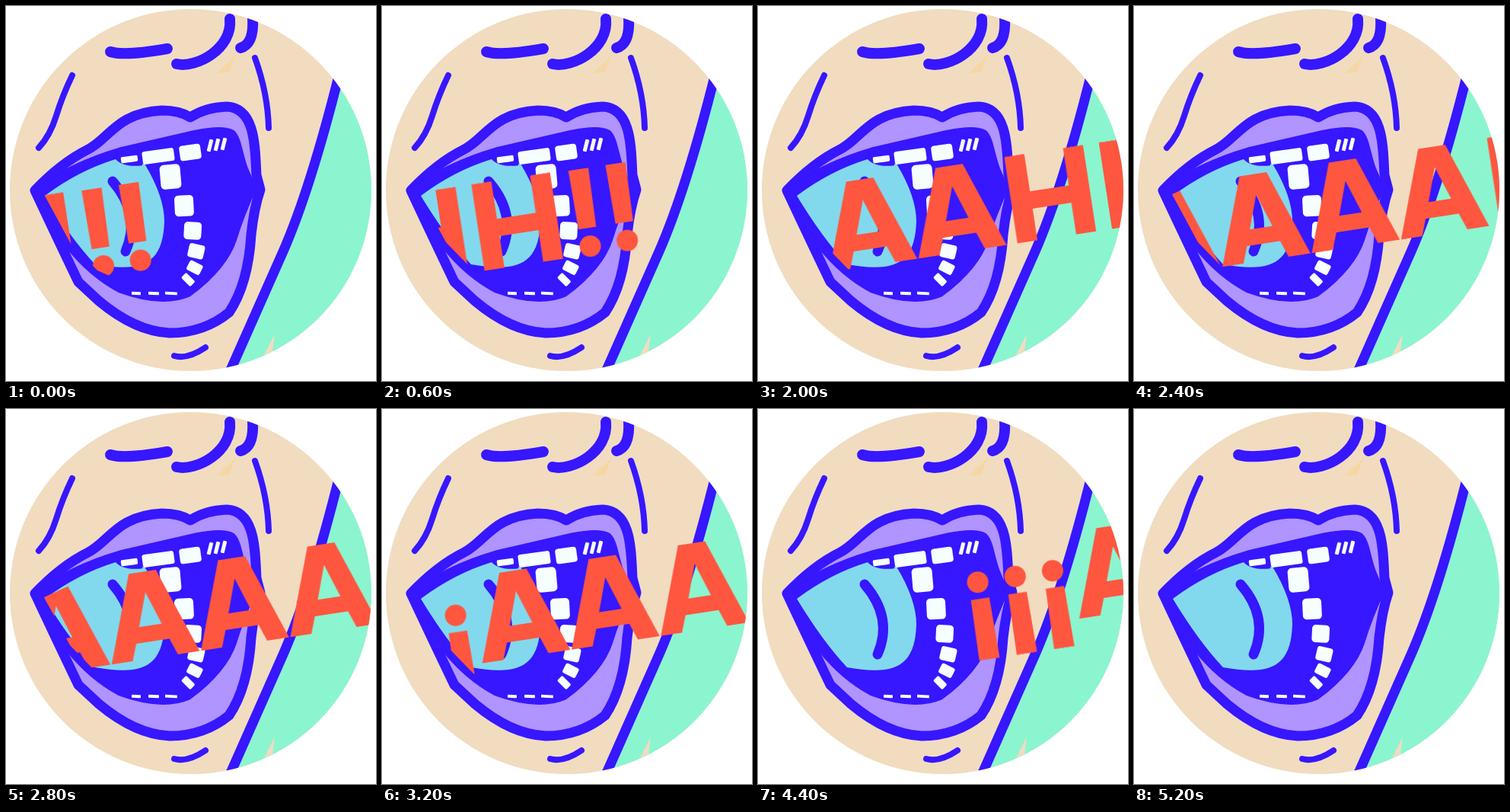
These frames come from a looping animation (486 px wide and 492 px high, 5.4 s). An HTML page:

```html
<!DOCTYPE html>
<html lang="en">
<head>
<meta charset="utf-8">
<title>Scream</title>
<style>
  html, body { margin: 0; width: 100%; height: 100%; overflow: hidden; background: #fff; }
  svg { display: block; width: 486px; height: 492px; }
  .ink { fill: none; stroke: #3617ff; stroke-linecap: round; }
  .tooth { fill: #f5ffff; }
  #shout { fill: #ff563f; animation: shout 5400ms steps(4) infinite; }

  /* The word climbs out of the mouth in 200 ms hops. */
  @keyframes shout {
    0% { transform: translate(-995px, 524px); animation-timing-function: steps(6); }
    22.2222% { transform: translate(-704px, 472px); }
    37.037% { transform: translate(-395px, 424px); }
    51.8518% { transform: translate(-115px, 374px); }
    66.6666% { transform: translate(105.5px, 335px); }
    81.4814% { transform: translate(285.5px, 296px); }
    96.2962%, 100% { transform: translate(490px, 258px); }
  }
</style>
</head>
<body>
<svg viewBox="0 0 486 492" role="img" aria-label="iiiAAAAAHHH!!">
  <defs>
    <clipPath id="disc"><circle cx="242.5" cy="241.5" r="237.5"/></clipPath>
    <clipPath id="throat"><path d="M130 100L85 231L50 247L84 310L120 347L136 354L150 420H486V100Z"/></clipPath>
    <g id="i"><path d="M1-80H25.500L27 0H0Z"/><circle cx="13.500" cy="-102" r="14"/></g>
    <path id="A" fill-rule="evenodd" d="M0 0L40-114H76L117 0H88L80-22H36L28 0ZM43-43H73L58-87Z"/>
    <path id="H" d="M0 0V-114.500H26.500V-65H78V-114.500H104.500V0H78V-42H26.500V0Z"/>
    <g id="bang"><path d="M0-113H26.500L25-35H1.500Z"/><circle cx="13.500" cy="-11" r="14"/></g>
  </defs>
  <g clip-path="url(#disc)">
    <rect width="486" height="492" fill="#f1dcc0"/>

    <!-- Collar -->
    <path fill="#8bf5cf" d="M438 90H486V492H290L355 342Q385 280 410 185Z"/>
    <path fill="#f1dcc0" d="M353 430L339 458L350 453Z"/>
    <path class="ink" stroke-width="13" d="M438 88Q400 240 364 322T293 482"/>

    <!-- Nose, cheeks and chin -->
    <path fill="#f6d7a4" d="M302 64L277 88L293 87Z"/>
    <g class="ink" stroke-width="14">
      <path d="M137 60Q155 66 212 56"/>
      <path d="M224 76C250 82 298 56 294 17"/>
      <path d="M308 55Q326 50 324 16"/>
    </g>
    <g class="ink" stroke-width="8">
      <path d="M87 91Q74 118 66 144T43 186"/>
      <path d="M327 68Q344 115 345 160"/>
      <path d="M221 459Q238 464 262 448"/>
    </g>

    <g id="mouth"></g>
    <g clip-path="url(#throat)">
      <g id="shout"><g id="word" transform="rotate(-8.7)"></g></g>
    </g>
  </g>
</svg>
<script>
  const BLUE = '#3617ff';
  const mouth = document.getElementById('mouth');
  const word = document.getElementById('word');

  function add(parent, tag, attrs) {
    const el = document.createElementNS('http://www.w3.org/2000/svg', tag);
    for (const key in attrs) el.setAttribute(key, attrs[key]);
    parent.append(el);
  }

  const shape = (d, fill, width) =>
    add(mouth, 'path', { d, fill, stroke: BLUE, 'stroke-width': width, 'stroke-linejoin': 'round' });
  const tooth = (x, y, w, h, turn) => add(mouth, 'rect', {
    class: 'tooth', x: -w / 2, y: -h / 2, width: w, height: h, rx: Math.min(w, h) / 5,
    transform: `translate(${x} ${y}) rotate(${turn})`
  });

  // Lips, mouth, tongue
  shape('M38 242Q72 206 108 188C136 174 145 140 205 137Q228 137 242 146Q262 133 290 132C328 134 327 185 329 222' +
    'L334 241Q326 264 322 300Q318 365 293 402Q260 429 215 429Q170 427 122 387L95 362Q70 310 38 242Z', '#b094ff', 13);
  shape('M40 243Q85 209 150 190L250 167Q285 160 297 167C308 178 305 205 325 238' +
    'Q308 275 299 305Q287 342 240 377Q205 392 150 372Q112 352 82 314Z', BLUE, 9);
  shape('M51 249Q95 216 144 201L182 207Q208 250 208 283C206 338 180 350 117 339Q85 305 51 249Z', '#82d9ed', 0);
  add(mouth, 'path', { class: 'ink', 'stroke-width': 13, d: 'M140 230Q178 274 157 322' });

  // Upper teeth grow towards the front, then narrow slits
  add(mouth, 'path', { class: 'ink', 'stroke-width': 5, d: 'M144 197Q152 209 177 207' });
  tooth(162, 201, 22, 8, -8);
  tooth(200, 197, 42, 17, -8);
  tooth(242, 192, 28, 20, -8);
  for (let k = 0; k < 3; k++) tooth(268 + 9 * k, 183 - k, 5, 16, 14);

  // Side teeth shrink and turn along the jaw
  for (let k = 0; k < 6; k++) {
    tooth(250 - 34 * (1 - k / 3.2) ** 2, 224 + 41 * k - 2.8 * k * k, 27 - 2 * k, 32 - 4.5 * k, 2 * k * k - 5);
  }
  for (let k = 0; k < 3; k++) tooth(171 + 23 * k, 377, 12 + 2 * k, 4, 3);

  // Lay the word out along its baseline
  function letters(id, count, start, pitch, y = 0) {
    for (let k = 0; k < count; k++) add(word, 'use', { href: '#' + id, x: start + k * pitch, y });
  }
  letters('i', 3, 0, 49.7, 34.5);
  letters('A', 5, 138.1, 118.7);
  letters('H', 3, 744.4, 125.6);
  letters('bang', 2, 1124.3, 49.2);
</script>
</body>
</html>
```
